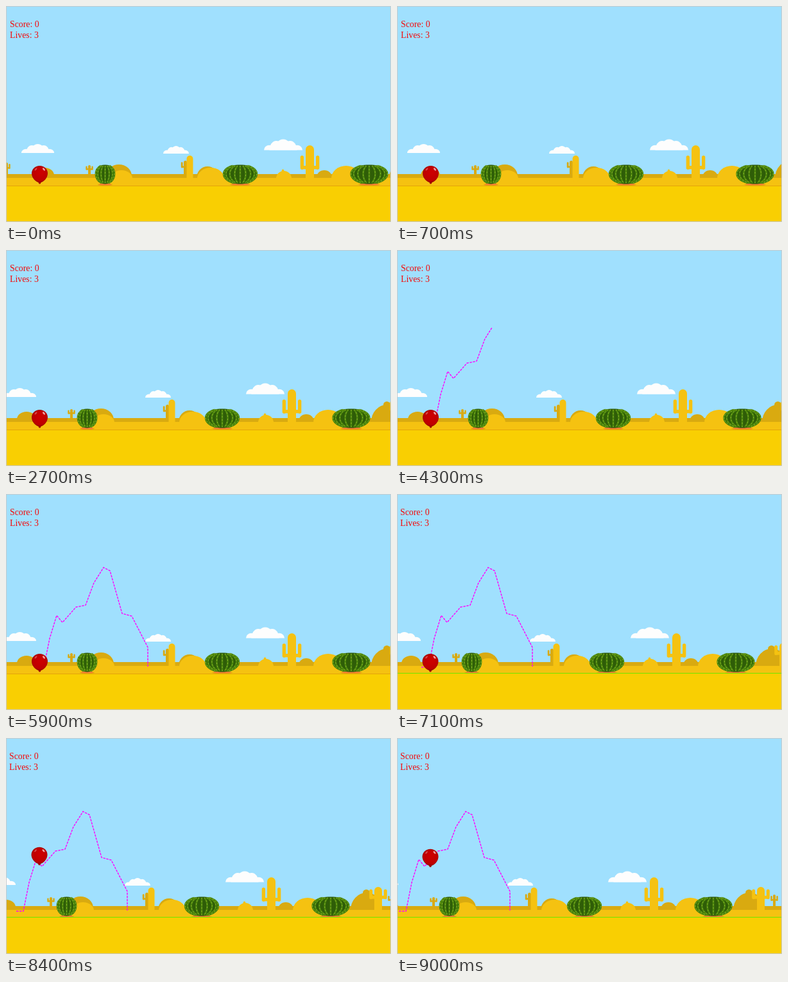
Write an HTML page with a canvas that moves like this. It is 600 px wide and 338 px high and loops after 9100 ms.

```html
<!DOCTYPE html>
<html lang="en">
<head>
<meta charset="utf-8">
<title>Desert balloon</title>
<style>
html, body { margin: 0; width: 100%; height: 100%; overflow: hidden; }
canvas { display: block; width: 600px; height: 338px; }
</style>
</head>
<body>
<canvas id="stage" width="600" height="338"></canvas>
<script>
const ctx = document.getElementById('stage').getContext('2d');
const LOOP = 9100, STEP = 100;
const DRAW_START = 2700, DRAW_TIME = 2900, FLIGHT_START = 6100;
const LIGHT = '#f5c211', DARK = '#d9aa10';

// Key points of the flight path, in screen coordinates during the pause.
const route = [
  [48, 271], [59, 271], [68, 226], [79, 190], [88, 201], [109, 177], [124, 174],
  [137, 139], [152, 115], [162, 120], [181, 187], [196, 191], [221, 240], [221, 270]
];

// Stage scroll: a gentle start, a pause for drawing, then the flight.
function introScroll(t) {
  const n = Math.min(t, 2000) / STEP;
  return Math.round(n + 0.02 * n * n);
}

function flightScroll(t) {
  const n = Math.max(0, t - FLIGHT_START) / STEP;
  return Math.round(n + 1.14 * Math.max(0, n - 15));
}

function routeY(x) {
  const i = route.findIndex(p => p[0] > x);
  const [x0, y0] = route[i - 1], [x1, y1] = route[i];
  return y0 + (y1 - y0) * (x - x0) / (x1 - x0);
}

function oval(color, x, y, rx, ry, tilt = 0) {
  ctx.fillStyle = color;
  ctx.beginPath();
  ctx.ellipse(x, y, rx, ry, tilt, 0, 7);
  ctx.fill();
}

function box(color, x, y, w, h) {
  ctx.fillStyle = color;
  ctx.fillRect(x, y, w, h);
}

function hill(color, x, top, rx, base) {
  ctx.fillStyle = color;
  ctx.beginPath();
  ctx.ellipse(x, base, rx, base - top, 0, Math.PI, 0);
  ctx.fill();
}

function post(color, x, top, w, h) {
  ctx.fillStyle = color;
  ctx.beginPath();
  ctx.roundRect(x - w / 2, top, w, h, w / 2);
  ctx.fill();
}

function saguaro(color, x, top, w, sides = [-1, 1], drop = 0.1) {
  const h = (color === LIGHT ? 270 : 264) - top;
  const reach = w * 0.85 + 1.1, armW = w * 0.32 + 1.2;
  const armTop = top + drop * h, armLen = 0.42 * h;
  post(color, x, top, w, h + w / 2);
  for (const side of sides) {
    post(color, x + side * reach, armTop, armW, armLen);
    box(color, side < 0 ? x - reach : x, armTop + armLen - armW * 1.1, reach, armW);
  }
}

function cloud(x, base, w, h) {
  for (let k = -2; k <= 2; k++) {
    const size = Math.abs(k);
    hill('#fdfdfd', x + w * (0.5 + 0.18 * k), base - h * Math.cos(0.55 * k), w * (0.22 - 0.04 * size), base);
  }
}

function greenCactus(x, w) {
  const r = w / 2, top = 248.5, bottom = 278.5, foot = 4 + w * 0.19;
  oval('#e9a010', x, 279.8, foot + 2, 1.4);
  oval('#f37b35', x, 279, foot, 1.3);

  ctx.save();
  ctx.translate(x, 0);
  ctx.beginPath();
  ctx.moveTo(0, top);
  for (const side of [1, -1]) {
    const ends = [[r * 0.75, top, r, 256, r, 263], [r, 270, r * 0.75, bottom, 0, bottom]];
    if (side < 0) ctx.moveTo(0, top);
    for (const c of ends) ctx.bezierCurveTo(...c.map((v, i) => i % 2 ? v : side * v));
  }
  ctx.fillStyle = '#2f5d08';
  ctx.fill();

  // Ribs bulge outward from the crown to the foot.
  const ribs = w > 40 ? 4 : 3;
  for (let i = -ribs; i <= ribs; i++) {
    const bulge = 1.2 * r * Math.sin(i / ribs * 1.3);
    ctx.beginPath();
    ctx.moveTo(bulge * 0.4, top + 1.5);
    ctx.bezierCurveTo(bulge, 256, bulge, 270, bulge * 0.35, bottom - 1.5);
    ctx.strokeStyle = '#4a850b';
    ctx.lineWidth = 2.6;
    ctx.stroke();
    ctx.strokeStyle = '#a4c03c';
    ctx.lineWidth = 0.8;
    ctx.setLineDash([2, 3]);
    ctx.stroke();
    ctx.setLineDash([]);
  }
  ctx.restore();
}

function scenery() {
  cloud(24, 230, 51, 14);
  cloud(245, 231, 40, 12);
  cloud(402, 225.5, 60, 17);

  box(DARK, 0, 263, 700, 7);
  saguaro(DARK, 1, 245, 4, [1]);
  hill(DARK, 60, 253, 15, 265);
  saguaro(DARK, 130, 249, 4);
  hill(DARK, 176, 248, 20, 266);
  saguaro(DARK, 279.5, 242, 5, [-1]);
  hill(DARK, 314, 251, 17, 269);
  hill(DARK, 496, 257, 12, 268);
  hill(DARK, 622, 242, 25, 269);
  post(DARK, 621.5, 237, 11, 14);
  saguaro(DARK, 661, 245, 4);

  box(LIGHT, 0, 269, 700, 12);
  hill(LIGHT, 180, 257, 17, 270);
  saguaro(LIGHT, 286.5, 234, 10, []);
  hill(LIGHT, 319, 253, 21, 270);
  hill(LIGHT, 433, 258, 12, 270);
  oval(LIGHT, 431.5, 258, 2, 2.5);
  saguaro(LIGHT, 473.5, 218, 13, [-1, 1], 0.31);
  hill(LIGHT, 530, 250, 23, 270);
  saguaro(LIGHT, 640, 233, 12);

  greenCactus(154.5, 30);
  greenCactus(365, 53);
  greenCactus(566, 58);
}

function drawRoute(progress) {
  const weight = (a, b) => Math.abs(b[0] - a[0]) + 0.35 * Math.abs(b[1] - a[1]);
  const sizes = route.slice(1).map((p, i) => weight(route[i], p));
  let left = progress * sizes.reduce((sum, size) => sum + size);
  ctx.beginPath();
  ctx.moveTo(...route[0]);
  sizes.forEach((size, i) => {
    const [x0, y0] = route[i], [x1, y1] = route[i + 1];
    const k = Math.max(0, Math.min(1, left / size));
    if (k > 0) ctx.lineTo(x0 + (x1 - x0) * k, y0 + (y1 - y0) * k);
    left -= size;
  });
  ctx.strokeStyle = '#ff00ff';
  ctx.lineWidth = 1.4;
  ctx.setLineDash([3.5, 1.5]);
  ctx.stroke();
  ctx.setLineDash([]);
}

function balloon(x, y) {
  ctx.save();
  ctx.translate(x, y);
  post('#a50000', 0, 11, 3.5, 4.5);
  ctx.beginPath();
  ctx.moveTo(0, 13.5);
  ctx.bezierCurveTo(-6, 13, -12.5, 6, -12.5, -1);
  ctx.bezierCurveTo(-12.5, -8, -7, -13, 0, -13);
  ctx.bezierCurveTo(7, -13, 12.5, -8, 12.5, -1);
  ctx.bezierCurveTo(12.5, 6, 6, 13, 0, 13.5);
  const shade = ctx.createRadialGradient(2, -3, 3, 0, 0, 14);
  shade.addColorStop(0, '#cb0000');
  shade.addColorStop(0.75, '#bd0000');
  shade.addColorStop(1, '#820000');
  ctx.fillStyle = shade;
  ctx.fill();
  oval('#f0a0a0', 6.5, -7.5, 1.3, 2.6, -0.75);
  oval('#d85050', -6, -7.5, 1, 2.5, 0.75);
  ctx.restore();
}

function draw(t) {
  const flown = flightScroll(t);
  const flying = t > FLIGHT_START;
  const nudge = flying ? 1 : 0;

  box('#a0e0fe', 0, 0, 600, 338);
  ctx.save();
  ctx.translate(-introScroll(t) - flown, 0);
  scenery();
  ctx.restore();
  box('#f9cf02', 0, 281, 600, 57);
  box(flying ? '#6ee600' : '#e5a40a', 0, flying ? 280 : 281, 600, 1);

  if (t >= DRAW_START) {
    ctx.save();
    ctx.translate(-flown, 0);
    drawRoute(Math.min(1, (t - DRAW_START) / DRAW_TIME));
    ctx.restore();
  }
  balloon(52.5 - nudge * 0.5, routeY(48.5 + flown) - 8);

  ctx.fillStyle = '#f50808';
  ctx.font = '13.8px "Liberation Serif", serif';
  ctx.fillText('Score: 0', 6 - nudge, 33);
  ctx.fillText('Lives: 3', 6 - nudge, 50);
  ctx.strokeStyle = '#c6cbcd';
  ctx.lineWidth = 1;
  ctx.strokeRect(0.5, 0.5, 599, 337);
}

function tick() {
  draw(Math.floor(performance.now() % LOOP / STEP) * STEP);
  requestAnimationFrame(tick);
}
tick();
</script>
</body>
</html>
```
